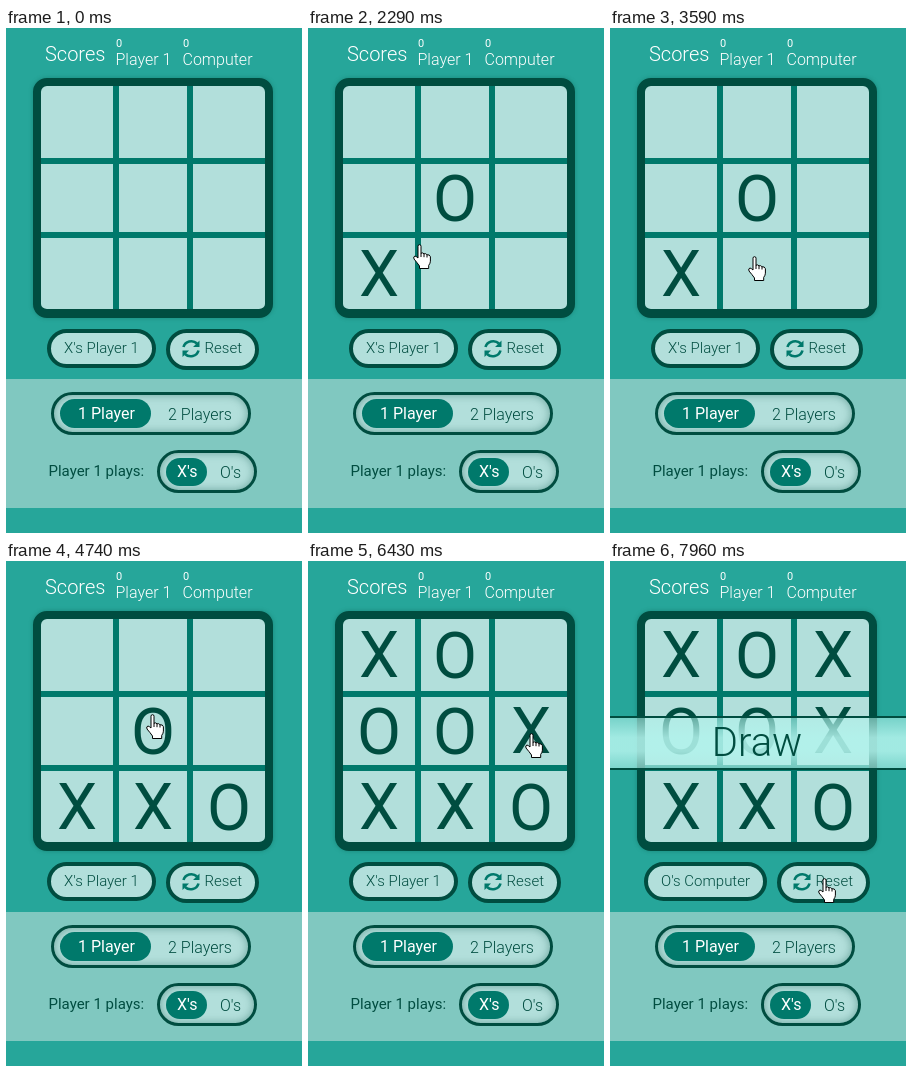
Animation, 296 px wide and 505 px high, one loop 8000 ms. Source, as an HTML page:

```html
<!DOCTYPE html>
<html lang="en">
<head>
<meta charset="utf-8">
<title>Noughts and crosses</title>
<style>
html, body { margin: 0; width: 100%; height: 100%; overflow: hidden; background: #26a69a; }
div, svg { position: absolute; box-sizing: border-box; }
svg { left: 0; top: 0; }
text { font: 300 16px Roboto, sans-serif; fill: #004d40; }
.board { left: 27px; top: 50px; width: 240px; height: 240px; border: 8px solid #004d40; border-bottom-width: 9px; border-radius: 14px; background: #b2dfdb; box-shadow: 0 0 4px rgba(0,77,64,.35); }
.panel { left: 0; top: 351px; width: 296px; height: 129px; background: #80c8c0; }
.button { border: 4px solid #004d40; border-radius: 22px; background: #b2dfdb; }
.toggle { border-width: 3px; box-shadow: inset 0 0 8px rgba(0,77,64,.4); }
.pill { background: #00796b; border-radius: 15px; }
.light { fill: #fff; }
.regular { font-weight: 400; }
.label { font-size: 15px; }
.mark { font-size: 64px; font-weight: 400; text-anchor: middle; }
</style>
</head>
<body>
<div class="board"></div>
<div class="panel"></div>
<svg id="art" width="296" height="505" viewBox="0 0 296 505">
  <defs>
    <linearGradient id="sheen" x2="0" y2="1" stop-color="#b2f3ec">
      <stop offset="0" stop-color="#b2f3ec" stop-opacity=".55"/>
      <stop offset=".4" stop-color="#b2f3ec" stop-opacity=".88"/>
      <stop offset=".65" stop-color="#b2f3ec" stop-opacity=".88"/>
      <stop offset="1" stop-color="#b2f3ec" stop-opacity=".6"/>
    </linearGradient>
  </defs>
  <path d="M110 58V281M184 58V281M35 133H259M35 207H259" stroke="#00796b" stroke-width="6"/>
  <text class="light" x="39" y="33" style="font-size:20px">Scores</text>
  <g class="light">
    <text class="light regular" x="110" y="19" style="font-size:11px">0</text>
    <text class="light" x="109.500" y="37">Player 1</text>
    <text class="light regular" x="177" y="19" style="font-size:11px">0</text>
    <text class="light" x="176.500" y="37">Computer</text>
  </g>
  <g id="marks"></g>
  <text id="turn" class="label" x="95.500" y="325" text-anchor="middle"></text>
  <g id="reset">
    <path d="M177.500 319a8 7.500 0 0 1 13.500-3.500M192.500 322.500a8 7.500 0 0 1-13.500 3.500" fill="none" stroke="#00796b" stroke-width="2.600"/>
    <path d="M193.500 312.500v6.500h-6.500zM176.500 329v-6.500h6.500z" fill="#00796b"/>
    <text class="label" x="198.500" y="325">Reset</text>
  </g>
  <text class="light regular" x="72" y="391">1 Player</text>
  <text x="162" y="392">2 Players</text>
  <text class="label regular" x="42.500" y="448">Player 1 plays:</text>
  <text class="light regular" x="171" y="449">X's</text>
  <text x="214" y="450">O's</text>
  <g id="banner">
    <rect y="155" width="296" height="54" fill="url(#sheen)"/>
    <path d="M0 156H296M0 208H296" stroke="#004d40" stroke-width="2"/>
    <text x="147" y="195" text-anchor="middle" style="font-size:40px">Draw</text>
  </g>
  <g id="cursor" stroke="#000" fill="#fff" stroke-linejoin="round">
    <path id="arrow" d="M.5 .5V16.500L4.200 13 6.700 18.500 9 17.500 6.600 12H11.500Z"/>
    <g id="hand" transform="translate(-6)">
      <path d="M5 14V2.200a1.500 1.500 0 0 1 3 0V9.200q1.800-.9 3 .6 1.800-.7 2.900.9 2.900-.3 3.500 2v4.500q0 2-1.700 4.200V24.500H6.500V22Q4 18.500 1 15 0 12.400 2 12 3.400 12.400 5 14Z"/>
      <path d="M8 9v4M11 10v3.200M14 11v2.500" fill="none"/>
    </g>
  </g>
</svg>
<script>
const LOOP = 8000, END = 6890;
const $ = id => document.getElementById(id);
const art = $('art');

function box(className, x, y, w, h) {
  const el = document.createElement('div');
  el.className = className;
  el.style.cssText = `left:${x}px;top:${y}px;width:${w}px;height:${h}px`;
  art.before(el);
  return el;
}

const turnButton = box('button', 41, 301, 109, 39);
const resetButton = box('button', 160, 301, 93, 41);
box('button toggle', 45, 364, 200, 43);
box('pill', 54, 371, 91, 29);
box('button toggle', 151, 422, 100, 43);
box('pill', 160, 430, 41, 28);
const targets = [...document.querySelectorAll('.board, .button')];

// Each round: time, cell taken by X, cell taken by O
const rounds = [[2160, 6, 4], [3900, 7, 8], [5230, 0, 3], [6200, 5, 1], [END, 2]];
const marks = rounds.flatMap(([time, ...cells]) => cells.map((cell, player) => {
  const el = document.createElementNS('http://www.w3.org/2000/svg', 'text');
  el.setAttribute('class', 'mark');
  el.setAttribute('x', 71 + 76 * (cell % 3));
  el.setAttribute('y', 116 + 76 * Math.floor(cell / 3) + player / 2);
  el.textContent = 'XO'[player];
  $('marks').append(el);
  return { time, el };
}));

// Pointer strokes: start, end, destination, optional bend
const entry = [233, 498];
const strokes = [
  [490, 1230, [103, 297], [185, 385]],
  [1270, 1570, [75, 238]],
  [2160, 2290, [111, 215]],
  [2290, 2950, [206, 215], [225, 549]],
  [2950, 3590, [144, 228], [250, -15]],
  [3900, 4690, [188, 162], [230, 215]],
  [4690, 4740, [146, 153]],
  [4740, 5180, [83, 106]],
  [5610, 5660, [97, 104]],
  [5660, 5940, [223, 186]],
  [6390, 6660, [221, 93]],
  [7090, 7910, [214, 317], [185, 460]]
];

function tipAt(t) {
  let from = entry;
  for (const [start, end, to, bend] of strokes) {
    if (t < start) break;
    if (t < end) {
      const k = (t - start) / (end - start);
      return from.map((a, i) => {
        const mid = bend ? bend[i] : (a + to[i]) / 2;
        return (1 - k) ** 2 * a + 2 * k * (1 - k) * mid + k * k * to[i];
      });
    }
    from = to;
  }
  return from;
}

const show = (el, on) => { el.style.display = on ? '' : 'none'; };

function drawCursor(t) {
  const visible = t >= strokes[0][0];
  show($('cursor'), visible);
  if (!visible) return;
  const [x, y] = tipAt(t).map(Math.round);
  const pointing = targets.some(el => {
    const r = el.getBoundingClientRect();
    return x >= r.left && x <= r.right && y >= r.top && y <= r.bottom;
  });
  $('cursor').setAttribute('transform', `translate(${x} ${y})`);
  show($('hand'), pointing);
  show($('arrow'), !pointing);
}

function render(t) {
  for (const { time, el } of marks) show(el, t >= time);
  const over = t >= END, shift = over ? 7 : 0;
  show($('banner'), over);
  $('turn').textContent = over ? "O's Computer" : "X's Player 1";
  turnButton.style.left = 41 - shift + 'px';
  turnButton.style.width = 109 + 2 * shift + 'px';
  resetButton.style.left = 160 + shift + 'px';
  $('reset').setAttribute('transform', `translate(${shift})`);
  drawCursor(t);
}

const start = performance.now();
function tick() {
  render((performance.now() - start) % LOOP);
  requestAnimationFrame(tick);
}
tick();
</script>
</body>
</html>
```
